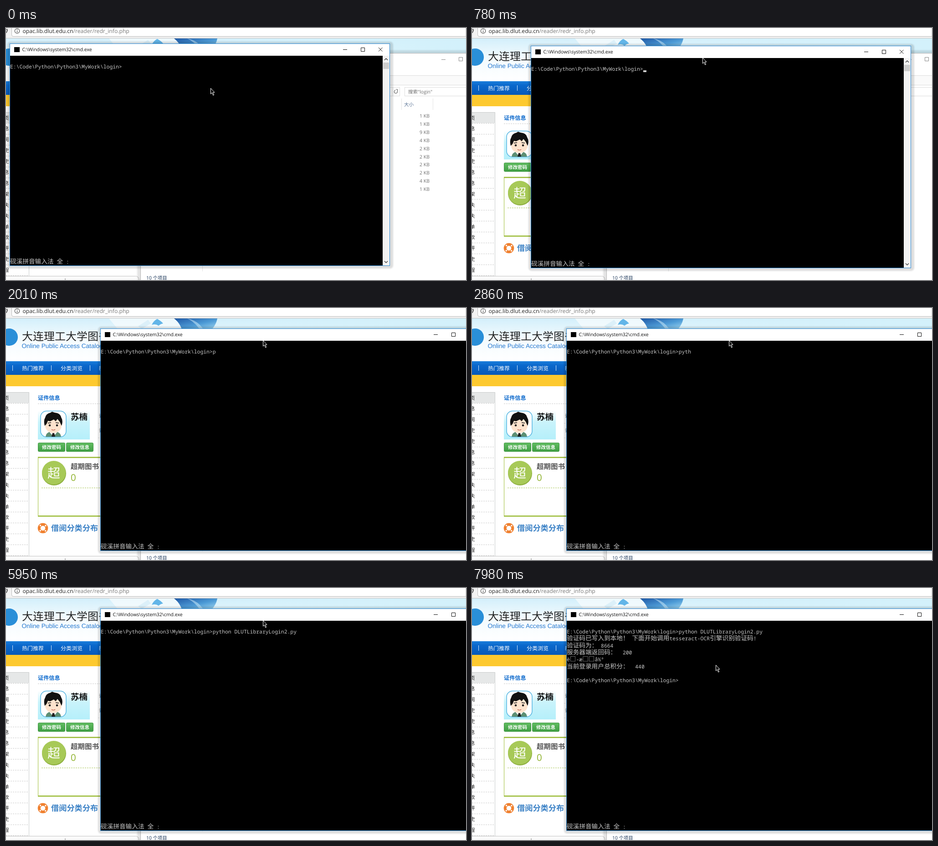
Recreate the animation shown at these times as an HTML page. Size 1010x554 px, loop 8 s.

```html
<!DOCTYPE html>
<html lang="zh-CN">
<head>
<meta charset="utf-8">
<title>Library login</title>
<style>
  html, body { margin: 0; width: 100%; height: 100%; overflow: hidden; background: #fff; }
  svg { display: block; width: 1010px; height: 554px; }
  text {
    font-family: "Open Sans", "Noto Sans CJK SC", "Noto Sans CJK", sans-serif;
    font-size: 10.5px; white-space: pre; text-rendering: geometricPrecision;
  }
  .console text { fill: #c8c8c8; }
  .console .half { font-family: "Noto Sans Mono", "DejaVu Sans Mono", monospace; font-size: 11.38px; }
  .console .full { font-family: "Noto Sans CJK SC", "Noto Sans CJK", sans-serif; font-size: 13.66px; font-weight: 300; }
  .nav text { font-size: 12px; fill: #fff; }
  .side text { font-size: 11px; fill: #222; }
  .files text { fill: #6d6d6d; }
</style>
</head>
<body>
<svg viewBox="0 0 1010 554">
  <defs>
    <linearGradient id="sky" x2="0" y2="1">
      <stop offset="0" stop-color="#d3effb"/><stop offset=".45" stop-color="#f3fbfe"/><stop offset="1" stop-color="#fff"/>
    </linearGradient>
    <linearGradient id="skyRight">
      <stop offset="0" stop-color="#d3f1fb" stop-opacity="0"/><stop offset="1" stop-color="#d3f1fb"/>
    </linearGradient>
    <linearGradient id="bar" x2="0" y2="1">
      <stop offset="0" stop-color="#1b7edb"/><stop offset=".3" stop-color="#0a68cc"/><stop offset="1" stop-color="#0759b8"/>
    </linearGradient>
    <linearGradient id="card" x2="0" y2="1">
      <stop offset="0" stop-color="#fff"/><stop offset=".4" stop-color="#c9f3fb"/><stop offset="1" stop-color="#b5effa"/>
    </linearGradient>
    <linearGradient id="globe" x2="1" y2="1">
      <stop offset="0" stop-color="#1d57a5"/><stop offset=".55" stop-color="#4d9bd6"/><stop offset="1" stop-color="#a5dbf3"/>
    </linearGradient>
    <linearGradient id="green" x2="0" y2="1">
      <stop offset="0" stop-color="#62bd62"/><stop offset="1" stop-color="#3f9e44"/>
    </linearGradient>
    <filter id="soft" x="-5%" y="-5%" width="110%" height="110%"><feGaussianBlur stdDeviation="1.6"/></filter>
  </defs>

  <!-- library page -->
  <rect width="1010" height="554" fill="#fff"/>
  <rect y="23" width="1010" height="94" fill="url(#sky)"/>
  <rect x="200" y="23" width="810" height="94" fill="url(#skyRight)"/>
  <path d="M226 23h148l14 24H246z" fill="#fff" opacity=".6"/>
  <path d="M290 40l22-14 6 8-20 12z" fill="#cfeaf7" opacity=".6"/>
  <path d="M320 37q4-9 12-13 8 4 13 10-6 1-10 5-6-5-15-2z" fill="#63b5e8"/>
  <path d="M369 23h95q-2 12-12 24h-66q-5-15-17-24z" fill="url(#globe)"/>
  <path d="M398 23q22 4 34 22h-8q-11-15-26-22z" fill="#d4effb" opacity=".5"/>
  <circle cx="7" cy="64" r="19" fill="#2a8fd8"/>
  <text x="35" y="71" style="font-size:24px" fill="#222">大连理工大学图书馆</text>
  <text x="34.500" y="88" style="font:13.65px 'Liberation Sans',sans-serif" fill="#2779d0">Online Public Access Catalogue</text>

  <rect y="117" width="296" height="30" fill="url(#bar)"/>
  <g class="nav">
    <path d="M14.500 126v12M99.500 126v12M184.500 126v12" stroke="#d5e8fa"/>
    <text x="35" y="136.500">热门推荐</text><text x="120" y="136.500">分类浏览</text><text x="204" y="136.500">新书通报</text>
  </g>
  <rect y="147" width="296" height="25" fill="#fdc92f"/>

  <g class="side" id="side">
    <rect y="185" width="51" height="24" fill="#e6e8e8"/>
    <path d="M0 185.500h50.500V545" fill="none" stroke="#c9cccc"/>
  </g>

  <text x="70" y="201.500" style="font-size:12.2px;font-weight:700" fill="#0a68cc">证件信息</text>
  <path d="M70 210.500h226" stroke="#ccc" stroke-dasharray="3 2"/>
  <rect x="70" y="226" width="114" height="63" fill="url(#card)"/>
  <rect x="76" y="226.500" width="56" height="57" rx="13" fill="#fff" stroke="#55b5e2" stroke-width="1.500"/>
  <path d="M87 283q1-9 10-11h14q9 2 10 11z" fill="#5d8f74"/>
  <path d="M95 272l9 11 9-11z" fill="#fff"/>
  <path d="M102 275h4l2 8h-8z" fill="#222"/>
  <ellipse cx="104" cy="259" rx="18" ry="15.500" fill="#fde3cd"/>
  <path d="M85 259q-3-12 1-18 2-9 12-11l3-2 6 2q12 1 14 10 5 8 1 19l-4-9-5-6-4 5-4-4-8 4-5-1-3 7z" fill="#111"/>
  <path d="M92 253l7-1M109 252l7 1" stroke="#222" stroke-width="1.500"/>
  <circle cx="96" cy="258" r="2.300" fill="#222"/><circle cx="112" cy="258" r="2.300" fill="#222"/>
  <path d="M100 267q4 3 8 0" fill="none" stroke="#b54" stroke-width="1.200"/>
  <text x="142" y="246" style="font-size:18.5px;font-weight:700" fill="#111">苏楠</text>
  <g fill="#555"><text x="204" y="241">证件号</text><text x="204" y="273">读者类型</text></g>
  <path d="M202 253.500h94M202 285.500h94" stroke="#ddd" stroke-dasharray="3 2"/>
  <rect x="70.500" y="296.500" width="59" height="19" rx="2" fill="url(#green)" stroke="#3c9540"/>
  <rect x="132.500" y="296.500" width="59" height="19" rx="2" fill="url(#green)" stroke="#3c9540"/>
  <g fill="#fff" font-weight="700"><text x="79" y="310">修改密码</text><text x="141" y="310">修改信息</text></g>

  <path d="M70.500 328V458" stroke="#a0bf3a"/>
  <path d="M70 328.500h226M70 457.500h226" stroke="#9aba35" stroke-width="2.500"/>
  <circle cx="105.500" cy="363.500" r="26.500" fill="#8cae3d"/>
  <circle cx="105" cy="362" r="26" fill="#a7c957"/>
  <text x="91" y="372.500" style="font-size:28px" fill="#fff">超</text>
  <text x="142" y="354" style="font-size:15.5px;font-weight:700" fill="#555">超期图书</text>
  <text x="142" y="380" style="font-size:20.5px" fill="#8fb22e">0</text>
  <path d="M78 395.500h218" stroke="#a9c75a" stroke-dasharray="3 2"/>
  <circle cx="81" cy="484" r="8.300" fill="none" stroke="#f08130" stroke-width="6"/>
  <circle cx="81" cy="484" r="8" fill="none" stroke="#fff" stroke-width="3" stroke-dasharray="3 9.570" stroke-dashoffset="-4.800"/>
  <text x="99" y="490" style="font-size:17.2px;font-weight:700" fill="#3c82c6">借阅分类分布</text>

  <path d="M0 545.500h284q8 0 8 9" fill="none" stroke="#c4c4c4"/>
  <rect y="546" width="286" height="8" fill="#fafafa"/>
  <rect x="129" y="551" width="2" height="2" fill="#999"/>

  <!-- address bar -->
  <rect width="1010" height="23" fill="#f2f2f2"/>
  <path d="M1010 -1H12.500V15q0 3.500 3.500 3.500H1010z" fill="#fff" stroke="#bbb"/>
  <path d="M0 22.500h1010" stroke="#c6c6c6"/>
  <path d="M-2 11q5-1 4-6M-1 3h4v4" fill="none" stroke="#555" stroke-width="1.500"/>
  <circle cx="24.500" cy="6.500" r="5.200" fill="none" stroke="#555" stroke-width="1.200"/>
  <path d="M24.500 3v1.500M24.500 5.800v4" stroke="#555" stroke-width="1.300"/>
  <text x="36.500" y="11" style="font-size:12.15px" fill="#777"><tspan fill="#222">opac.lib.dlut.edu.cn</tspan>/reader/redr_info.php</text>

  <!-- file manager -->
  <rect x="288" y="49" width="740" height="520" rx="7" opacity=".1" filter="url(#soft)"/>
  <rect x="295.500" y="55.500" width="730" height="510" fill="#fff" stroke="#b5b5b5"/>
  <g class="files" id="files" fill="none" stroke="#dcdcdc">
    <rect x="296" y="104.500" width="730" height="21" fill="#fafafa"/>
    <path d="M400 130.500h464.500v19H400M849.500 131v18"/>
    <rect x="875.500" y="130.500" width="150" height="19"/>
    <path d="M868.500 155v25M937.500 155v25M431.500 155v380" stroke="#e3e3e3"/>
    <path d="M956 69.500h9M994.500 64.500h8v8h-8z" stroke="#888"/>
    <path d="M859 138.500a3.500 3.500 0 1 1-4-1.800M856 135h3.500v3.500" stroke="#666" stroke-width="1.200"/>
    <g stroke="none">
      <text x="883" y="144">搜索"login"</text>
      <text x="874" y="171.500" style="fill:#566f92">大小</text>
      <text x="308" y="553" style="fill:#1e395b;font-size:10.400px">10 个项目</text>
    </g>
  </g>

  <!-- console window -->
  <g id="win" class="console">
    <rect x="-5" y="-3" width="847" height="499" rx="7" opacity=".13" filter="url(#soft)"/>
    <rect x=".5" y="1.500" width="834" height="488" fill="#fff" stroke="#2b8ad6"/>
    <rect x="1" y="28" width="818" height="461"/>
    <rect x="819" y="28" width="15" height="461" fill="#f3f3f3"/>
    <rect x="820" y="43" width="13" height="14" fill="#cdcdcd"/>
    <path d="M823 37.500l3.500-3.500 3.500 3.500M823 479.500l3.500 3.500 3.500-3.500" fill="none" stroke="#444" stroke-width="1.500"/>
    <rect x="10" y="9" width="12" height="11"/>
    <text id="caption" x="27.500" y="18" style="fill:#111"></text>
    <path d="M732 14.500h9M771.500 10.500h8v8h-8zM810 10l8.500 8.500M818.500 10l-8.500 8.500" fill="none" stroke="#111"/>
    <g id="ime"></g>
    <g id="lines"></g>
    <rect id="caret" width="7" height="4" fill="#ccc"/>
  </g>

  <path id="mouse" d="M.5 .5V13L3.400 10.300 5.700 16 7.600 15.200 5.300 9.700H9z" stroke="#fff" stroke-width="1"/>
</svg>
<script>
const $ = id => document.getElementById(id);
const CELL = 6.83, ROW = 15.32, LOOP = 8000;

function add(parent, tag, attrs, label = '') {
  const el = document.createElementNS('http://www.w3.org/2000/svg', tag);
  for (const key in attrs) el.setAttribute(key, attrs[key]);
  el.textContent = label;
  parent.append(el);
}

// Places a console line on the cell grid: wide glyphs take two cells.
function printLine(parent, line, row) {
  let x = 1;
  for (const run of line.match(/[\u2500-\uffff]+|[^\u2500-\uffff]+/g) || []) {
    const wide = run.charCodeAt(0) >= 0x2500;
    add(parent, 'text', { x, y: 56 + row * ROW, class: wide ? 'full' : 'half' }, run);
    x += run.length * CELL * (wide ? 2 : 1);
  }
}

[...'页息阅史史息息架失失单款评史程'].forEach((char, i) => {
  const y = 197.5 + i * 23.9;
  add($('side'), 'text', { x: -4.5, y: y + 4 }, char);
  add($('side'), 'path', { d: `M0 ${Math.round(y + 11.5) + .5}h50`, stroke: '#ccc', 'stroke-dasharray': '3 2' });
});
[1, 1, 9, 4, 2, 2, 2, 2, 4, 1].forEach((size, i) =>
  add($('files'), 'text', { x: 908, y: 197 + i * 17.9, stroke: 'none' }, size + ' KB'));
printLine($('ime'), '砚溪拼音输入法 全 :', 28);

const PROMPT = 'E:\\Code\\Python\\Python3\\MyWork\\login>';
const SHELL = 'C:\\Windows\\system32\\cmd.exe';
const SCRIPT = 'DLUTLibraryLogin2.py';
const SAVED = '验证码已写入到本地！ 下面开始调用tesseract-OCR引擎识别验证码!';
const CODE = '验证码为： 8664';
const RESULT = ['服务器端返回码：  200', 'è□-æ□□å½º', '当前登录用户总积分：  440'];

// Each entry changes only what it names; caret marks the end of the last line.
const steps = [
  { t: 0, win: [8, 33], mouse: [449, 132], typed: '', out: [], caret: false, caption: SHELL },
  { t: 120, mouse: [420, 108] },
  { t: 240, mouse: [390, 84] },
  { t: 390, mouse: [375, 69] },
  { t: 510, mouse: [365, 60] },
  { t: 630, caret: true },
  { t: 780, win: [129, 38], mouse: [506, 65] },
  { t: 930, win: [207, 44], mouse: [564, 71] },
  { t: 1210, caret: false },
  { t: 1640, caret: true },
  { t: 2010, typed: 'p', caret: false },
  { t: 2160, caret: true },
  { t: 2440, typed: 'py' },
  { t: 2560, typed: 'pyt', caret: false },
  { t: 2710, caret: true },
  { t: 2860, typed: 'pyth', caret: false },
  { t: 3270, typed: 'pytho', caret: true },
  { t: 3420, typed: 'python', caret: false },
  { t: 3700, typed: 'python ', caret: true },
  { t: 4250, caret: false },
  { t: 4500, typed: 'python d' },
  { t: 4800, caret: true },
  { t: 5240, typed: 'python DLUTJwcLogin.py', caret: false },
  { t: 5520, typed: 'python DLUTLibraryLogin.py' },
  { t: 5950, typed: 'python ' + SCRIPT },
  { t: 6380, out: [''], caret: true, caption: 'python  ' + SCRIPT },
  { t: 6940, caret: false },
  { t: 7060, out: [SAVED] },
  { t: 7620, out: [SAVED, CODE], mouse: [570, 84] },
  { t: 7740, mouse: [570, 118] },
  { t: 7860, out: [SAVED, CODE, ...RESULT], mouse: [552, 148] },
  { t: 7980, out: [SAVED, CODE, ...RESULT, '', PROMPT], mouse: [535, 169], caption: SHELL }
];
const states = [];
steps.forEach((step, i) => states.push({ ...states[i - 1], ...step }));

function show({ win, mouse, typed, out, caret, caption }) {
  const rows = [PROMPT + typed, ...out];
  const last = rows.length - 1;
  $('win').setAttribute('transform', `translate(${win})`);
  $('mouse').setAttribute('transform', `translate(${mouse})`);
  $('caption').textContent = caption;
  $('lines').replaceChildren();
  rows.forEach((line, row) => printLine($('lines'), line, row));
  $('caret').setAttribute('visibility', caret ? 'visible' : 'hidden');
  $('caret').setAttribute('x', Math.round(1 + rows[last].length * CELL));
  $('caret').setAttribute('y', 55 + Math.round(last * ROW));
}

const start = performance.now();
let shown;
function tick() {
  const t = (performance.now() - start) % LOOP;
  const state = states.findLast(s => s.t <= t);
  if (state !== shown) show(shown = state);
  requestAnimationFrame(tick);
}
tick();
</script>
</body>
</html>
```
